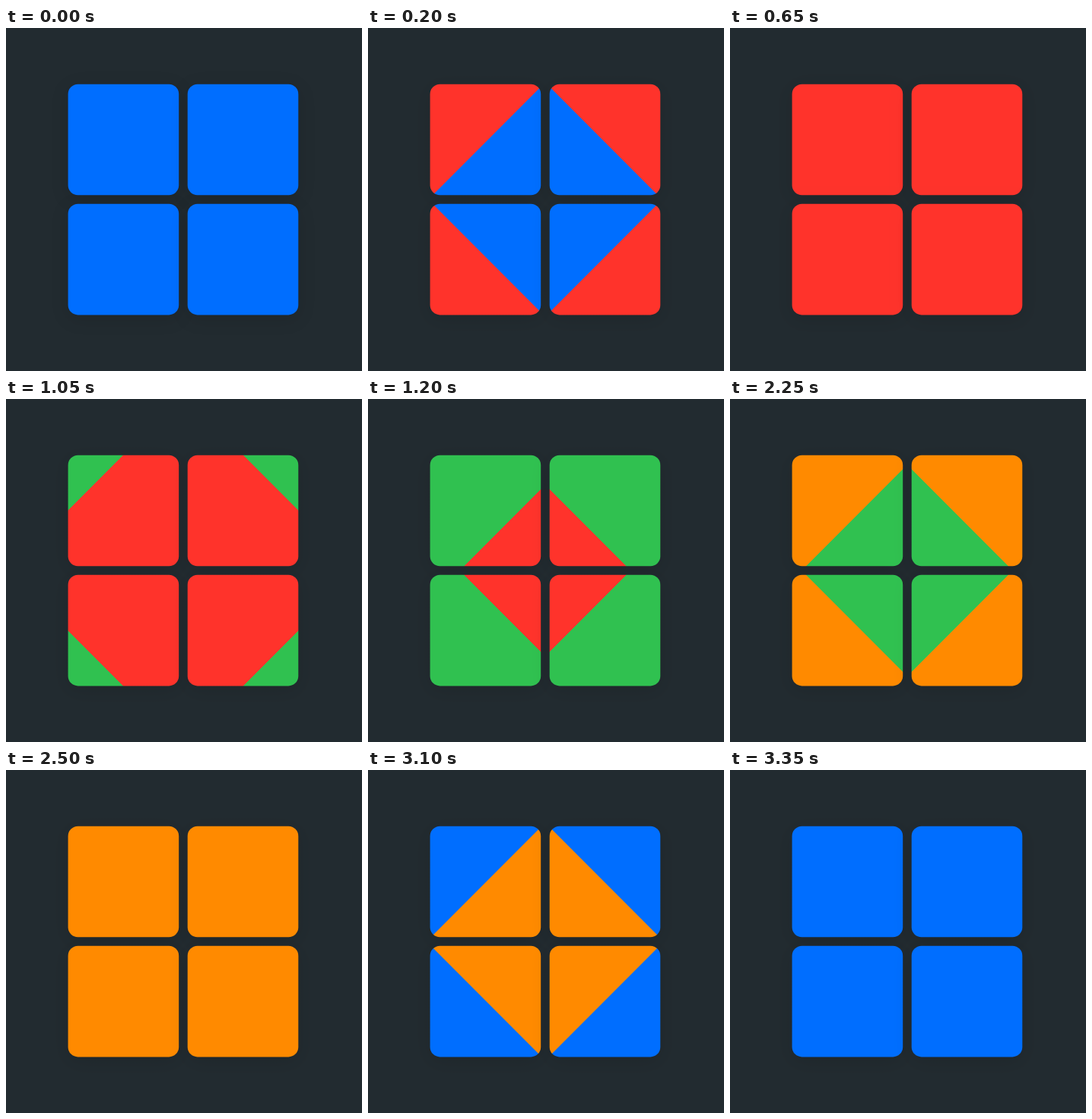
Animation of 468x450 px, one loop 3600 ms. Source, as an HTML page with a canvas:

```html
<!DOCTYPE html>
<html lang="en">
<head>
<meta charset="utf-8">
<title>Tiles</title>
<style>
  html, body { margin: 0; width: 100%; height: 100%; overflow: hidden; background: #222b30; }
  canvas { display: block; }
</style>
</head>
<body>
<canvas id="stage" width="468" height="450"></canvas>
<script>
const ctx = document.getElementById('stage').getContext('2d');

const LOOP = 3600;
const SWEEP = 450;
const SIZE = 145.6, PITCH = 157.1, LEFT = 81.6, TOP = 73.7, RADIUS = 13;
const BLUE = '#006eff', RED = '#ff332b', GREEN = '#30c150', ORANGE = '#ff8a00';

const sweeps = [
  { start: 30, from: BLUE, to: RED },
  { start: 973, from: RED, to: GREEN },
  { start: 2060, from: GREEN, to: ORANGE },
  { start: 2933, from: ORANGE, to: BLUE }
];

const easeOut = t => 1 - Math.pow(1 - t, 1.5);

// The new colour runs from the outer corner to the inner corner of a tile.
function tileFill(x, y, col, row, sweep, p) {
  if (p <= 0) return sweep.from;
  if (p >= 1) return sweep.to;
  const inX = x + (1 - col) * SIZE, outX = x + col * SIZE;
  const inY = y + (1 - row) * SIZE, outY = y + row * SIZE;
  const g = ctx.createLinearGradient(inX, inY, outX, outY);
  const edge = 1 - p;
  g.addColorStop(Math.max(0, edge - 0.002), sweep.from);
  g.addColorStop(Math.min(1, edge + 0.002), sweep.to);
  return g;
}

function drawTile(col, row, sweep, p) {
  const x = LEFT + col * PITCH, y = TOP + row * PITCH;
  ctx.fillStyle = tileFill(x, y, col, row, sweep, p);
  ctx.beginPath();
  ctx.roundRect(x, y, SIZE, SIZE, RADIUS);
  ctx.fill();
}

function draw(time) {
  const sweep = sweeps.filter(s => s.start <= time).pop() || sweeps[0];
  const t = Math.min(1, Math.max(0, (time - sweep.start) / SWEEP));
  const p = easeOut(t);

  ctx.shadowColor = 'transparent';
  ctx.fillStyle = '#222b30';
  ctx.fillRect(0, 0, 468, 450);

  ctx.shadowColor = 'rgba(0, 0, 0, 0.12)';
  ctx.shadowBlur = 24;
  ctx.shadowOffsetY = 5;
  for (let row = 0; row < 2; row++) {
    for (let col = 0; col < 2; col++) drawTile(col, row, sweep, p);
  }
}

const begin = performance.now();

function tick() {
  draw((performance.now() - begin) % LOOP);
  requestAnimationFrame(tick);
}

tick();
</script>
</body>
</html>
```
